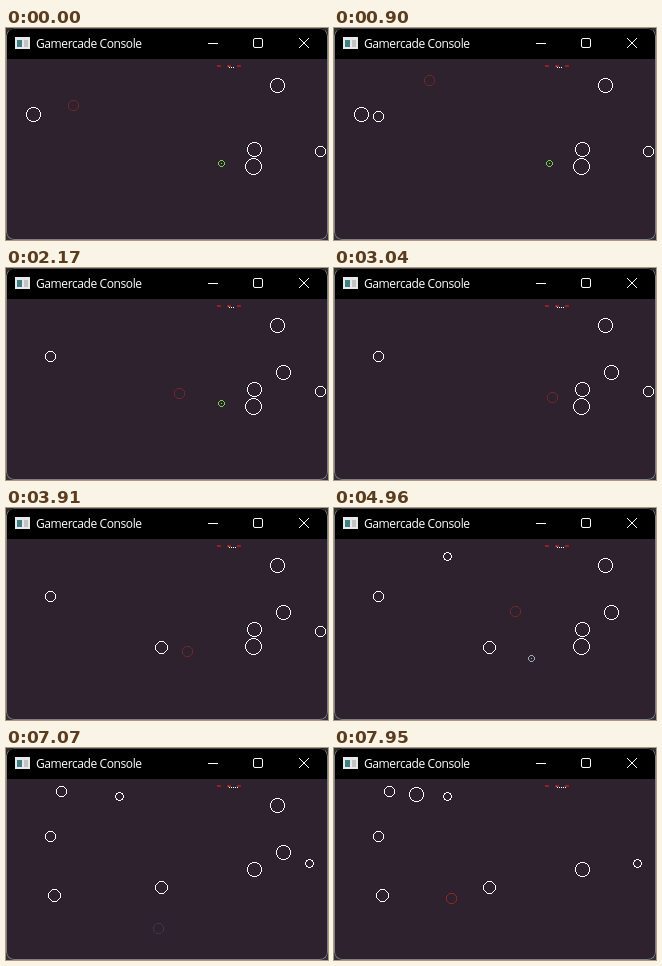
Write an HTML page with a canvas that moves like this. It is 322 by 212 pixels and loops after 7990 ms.

```html
<!DOCTYPE html>
<html lang="en">
<head>
<meta charset="utf-8">
<title>Gamercade Console</title>
<style>
  html, body { margin: 0; width: 322px; height: 212px; overflow: hidden; background: #333; }
  .window {
    position: relative; width: 322px; height: 212px;
    border-radius: 8px; overflow: hidden; background: #2e222f;
  }
  .window::after {
    content: ""; position: absolute; inset: 0;
    border: 1px solid #808080; border-top-color: #454545; border-radius: 8px;
  }
  .bar { position: absolute; left: 0; top: 0; width: 322px; height: 31px; background: #000; }
  .bar text {
    font: 12px "Open Sans", "Noto Sans", sans-serif;
    letter-spacing: -0.4px; fill: #fff;
  }
  canvas { position: absolute; left: 0; top: 0; }
</style>
</head>
<body>
<div class="window">
  <svg class="bar" viewBox="0 0 322 31">
    <path d="M9 9h15v12h-15z" fill="#e8e8e8"/>
    <path d="M11 12h5v7h-5z" fill="#3f7f86"/>
    <path d="M18 12h4v7h-4z" fill="#c4c4c4"/>
    <text x="30" y="20">Gamercade Console</text>
    <g fill="none" stroke="#fff">
      <path d="M202 15.5h10"/>
      <rect x="247.5" y="10.5" width="9" height="9" rx="1.5"/>
      <path d="M293 10l10 10M303 10l-10 10"/>
    </g>
  </svg>
  <canvas width="322" height="212"></canvas>
</div>
<script>
const LOOP = 7990;
const SPEED = 0.0615; // px per ms along the longer axis
const ctx = document.querySelector("canvas").getContext("2d");

// The player's run: keys held and pixels covered, or a wait in ms
const start = { x: 67, y: 77 };
const run = `wait 180, U 16, UR 9, R 24, DR 77, R 39, wait 147,
  R 3, D 14, L 38, wait 400, U 40, R 21, D 59, DL 18, L 32,
  L 24, UL 11, U 19`.split(",").map(leg => {
  const [keys, n] = leg.trim().split(" ");
  const has = k => keys.includes(k);
  return keys === "wait"
    ? { dx: 0, dy: 0, ms: +n }
    : { dx: n * (has("R") - has("L")), dy: n * (has("D") - has("U")), ms: n / SPEED };
});

// Waves come faster and faster
const wave = k => 580 + 1460 * k - 70 * k * k;

// Rings: x, y, radius and, for some, the wave that removes them.
// The first five are there at once, each later one comes with its wave.
const rings = [
  [27, 86, 7, 1], [271, 57, 7, 7], [248, 121, 7], [247, 138, 8, 4], [314, 123, 5, 3],
  [44, 88, 5], [277, 104, 7, 8], [155, 139, 6], [113, 48, 4],
  [48, 147, 6], [303, 115, 4], [55, 43, 5], [82, 46, 7]
].map(([x, y, r, last], i) => ({
  x, y, r,
  from: i < 5 ? 0 : wave(i - 5),
  to: last ? wave(last) : LOOP
}));

const pickups = [
  { x: 215, y: 135, from: 0, to: 3010, color: "#73cf4c" },
  { x: 197, y: 150, from: wave(3), to: 5960, color: "#9babb2" }
];

function playerAt(t) {
  let { x, y } = start;
  for (const { dx, dy, ms } of run) {
    const p = Math.min(1, Math.max(0, t / ms));
    x += dx * p;
    y += dy * p;
    t -= ms;
  }
  return [Math.round(x), Math.round(y)];
}

function playerTint(t) {
  if (t < 5000) return "#6e2727";
  if (t < 6700) return "#9e2328";
  return t < 7500 ? "#3e3546" : "#8e2525";
}

function box(x, y, w, h, color) {
  ctx.fillStyle = color;
  ctx.fillRect(x, y, w, h);
}

// Midpoint circle, one hard pixel wide
function ring(cx, cy, r, color) {
  let x = r, y = 0, err = 1 - r;
  while (x >= y) {
    for (const [a, b] of [[x, y], [y, x]])
      for (const sx of [-1, 1])
        for (const sy of [-1, 1]) box(cx + sx * a, cy + sy * b, 1, 1, color);
    y++;
    if (err < 0) err += 2 * y + 1;
    else { x--; err += 2 * (y - x) + 1; }
  }
}

function hud(score) {
  for (let i = 0; i < 3; i++) box(211 + 10 * i, 37, 4, 2, "#8e2222");
  box(222, 38, 1, 1, "#e85a3c");
  for (let i = 0; i < score; i++) box(223 + 2 * i, 39, 1, 1, "#fff");
}

function draw(t) {
  const visible = o => t >= o.from && t < o.to;
  ctx.clearRect(0, 0, 322, 212);
  hud(3 + pickups.filter(p => t >= p.to).length);
  for (const { x, y, r } of rings.filter(visible)) ring(x, y, r, "#fff");
  for (const { x, y, color } of pickups.filter(visible)) {
    ring(x, y, 3, color);
    box(x, y, 1, 1, color);
  }
  ring(...playerAt(t), 5, playerTint(t));
}

const begin = performance.now();
function tick() {
  draw((performance.now() - begin) % LOOP);
  requestAnimationFrame(tick);
}
tick();
</script>
</body>
</html>
```
